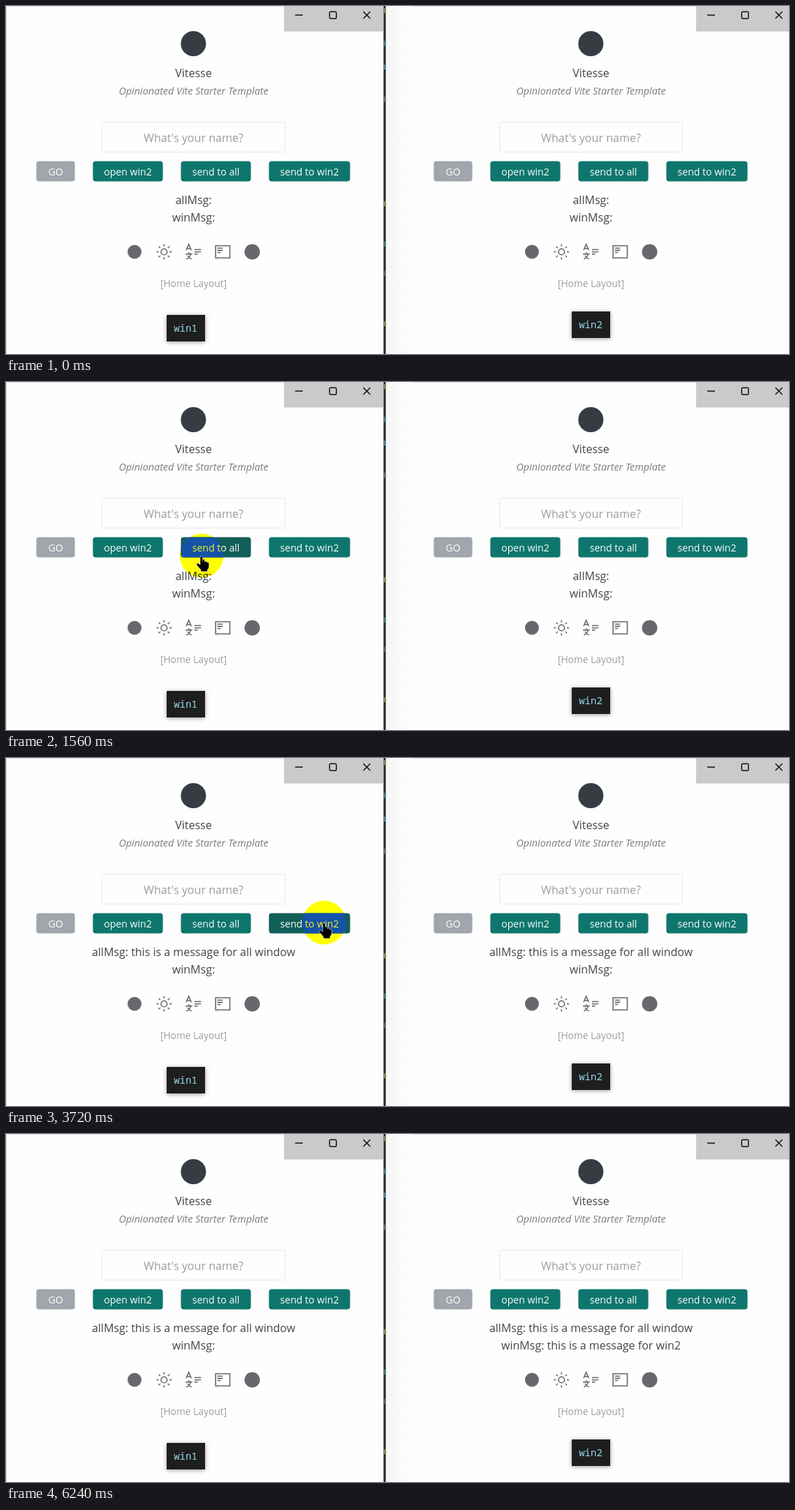
Animation, 1121 px wide and 499 px high, one loop 6840 ms. Source, as an HTML page with a canvas:

```html
<!DOCTYPE html>
<html lang="en">
<head>
<meta charset="utf-8">
<title>Two windows</title>
<style>
html, body { margin: 0; width: 100%; height: 100%; overflow: hidden; background: #fefefe; }
canvas { display: block; }
</style>
</head>
<body>
<canvas id="stage" width="1121" height="499"></canvas>
<script>
const ctx = document.getElementById('stage').getContext('2d');
const LOOP = 6840, RIGHT = 569, SPOT = 31.4;
const SANS = '"Open Sans", "Noto Sans", sans-serif';
const MONO = '"Noto Sans Mono", "DejaVu Sans Mono", monospace';

const plain = {
  bg: '#fefefe', text: '#42454a', soft: '#7b7d80', hint: '#9b9d9f', icon: '#66686b',
  logo: '#373b42', go: '#a1a6ac', btn: '#0f766d', hover: '#125e58', label: '#fbfdfc', line: '#e4e6e8'
};
const lit = {
  ...plain, bg: '#ffff00', text: '#48480c', soft: '#77770c', hint: '#9c9c08', icon: '#66662c',
  go: '#a2a600', btn: '#1453a8', hover: '#1453a8', label: '#f4f61c', line: '#e5e700'
};

const buttons = [
  { x: 43, w: 56, label: 'GO', off: true },
  { x: 124, w: 101, label: 'open win2' },
  { x: 250, w: 101, label: 'send to all' },
  { x: 376, w: 117, label: 'send to win2' }
];

// time, x, y of the spotlight centre
const path = [
  [360, 405, 545], [780, 334, 338], [1080, 334, 338], [1560, 280, 249], [1740, 281, 241],
  [3000, 281, 241], [3660, 455.5, 236], [4140, 455.5, 236], [4440, 454.5, 238],
  [5640, 454.5, 238], [6120, 470, 545]
];

function pointerAt(t) {
  const i = path.findIndex(p => p[0] > t);
  if (i < 1) return null;
  const [t0, x0, y0] = path[i - 1], [t1, x1, y1] = path[i];
  const u = (t - t0) / (t1 - t0), e = u * u * (3 - 2 * u);
  return { x: x0 + (x1 - x0) * e, y: y0 + (y1 - y0) * e };
}

function text(str, x, y, size, color, family = SANS, style = '') {
  ctx.font = `${style} ${size}px ${family}`;
  ctx.fillStyle = color;
  ctx.fillText(str, x, y);
}

function rect(x, y, w, h, color) {
  ctx.fillStyle = color;
  ctx.fillRect(x, y, w, h);
}

function disc(x, y, r, color) {
  ctx.fillStyle = color;
  ctx.beginPath();
  ctx.arc(x, y, r, 0, Math.PI * 2);
  ctx.fill();
}

function box(x, y, w, h, r) {
  ctx.beginPath();
  ctx.roundRect(x, y, w, h, r);
}

function stroke(d, color, width) {
  ctx.strokeStyle = color;
  ctx.lineWidth = width;
  ctx.stroke(new Path2D(d));
}

function sun(x, y, color) {
  let d = '';
  for (let i = 0; i < 8; i++) {
    const c = Math.cos(i * Math.PI / 4), s = Math.sin(i * Math.PI / 4);
    d += `M${x + c * 7.7} ${y + s * 7.7}L${x + c * 11} ${y + s * 11}`;
  }
  stroke(d, color, 1.6);
  ctx.beginPath();
  ctx.arc(x, y, 4.3, 0, Math.PI * 2);
  ctx.stroke();
}

function icons(c) {
  disc(184, 352.5, 10, c);
  sun(226.3, 352.5, c);
  ctx.save();
  ctx.translate(255.6, 339.8);
  ctx.scale(0.79, 0.79);
  stroke('M3 13L7.67 2.5L12.3 13M4.8 10H10.6M18 12H30M18 16H30M18 20H24M2 20H14M8 17V20M11.2 20Q10 26.5 3.3 29M5.4 23Q7.5 27 12.7 29', c, 2);
  ctx.restore();
  stroke('M300.1 343.8H320.5V361.2H300.1ZM302.6 347.2H310.4M302.6 350.4H310.4M302.6 353.5H307.3', c, 1.6);
  disc(352.5, 352.5, 11, c);
}

function page(c, all, win, hovered) {
  disc(268.3, 54, 18, c.logo);
  text('Vitesse', 268.5, 102, 16, c.text);
  text('Opinionated Vite Starter Template', 268.5, 127, 14.4, c.soft, SANS, 'italic');
  box(137.5, 166.5, 262, 43, 3);
  ctx.strokeStyle = c.line;
  ctx.lineWidth = 1;
  ctx.stroke();
  text("What's your name?", 268.5, 195, 16.1, c.hint);
  for (const b of buttons) {
    box(b.x + 0.4, 222.4, b.w - 0.8, 29.2, 4);
    ctx.fillStyle = b.off ? c.go : b === hovered ? c.hover : c.btn;
    ctx.fill();
    text(b.label, b.x + b.w / 2, 243, 14.1, c.label);
  }
  text('allMsg:' + all, 268.5, 284, 16, c.text);
  text('winMsg:' + win, 268.5, 309, 16, c.text);
  icons(c.icon);
  text('[Home Layout]', 268.5, 403, 13.8, c.hint);
}

function titleBar(x, w, mid) {
  rect(x, 0, w, 36.5, '#cacaca');
  stroke(`M${mid - 54} 13H${mid - 43}M${mid + 43.5} 8L${mid + 53.5} 18M${mid + 53.5} 8L${mid + 43.5} 18`, '#111', 1.5);
  box(mid - 4.7, 8.3, 9.6, 9.6, 1.5);
  ctx.stroke();
}

function tag(label, x, y) {
  ctx.save();
  ctx.shadowColor = 'rgba(0,0,0,.4)';
  ctx.shadowBlur = 6;
  ctx.shadowOffsetY = 1;
  rect(x, y, 55, 38, '#1e1e1e');
  ctx.restore();
  text(label, x + 27, y + 24, 14, '#92d8e8', MONO);
}

function gap() {
  rect(540.5, 0, 3.2, 499, '#2b2b2b');
  const specks = ['#8a8552', '#2f7c8f', '#3a8fa5', '#666', '#8f8650', '#38788a', '#5a5a5a', '#8c8448'];
  const spots = [3, 50, 84, 130, 280, 338, 380, 452];
  spots.forEach((y, i) => rect(541, y, 2, 7, specks[i]));
}

function backdrop() {
  rect(0, 0, 1121, 499, plain.bg);
  rect(0, 0, 1121, 1, '#dedede');
  rect(0, 0, 1, 499, '#d4d4d4');
  const shade = ctx.createLinearGradient(544, 0, 580, 0);
  shade.addColorStop(0, '#f4f6f6');
  shade.addColorStop(1, plain.bg);
  rect(544, 0, 36, 499, shade);
  gap();
}

function cursor(x, y, hand) {
  const d = hand
    ? 'M0 1.5Q0-.5 1.6-.5T3.2 1.5V7Q5-.0 6.2 7.4Q8.8 6 9.4 8.2Q12.2 7.5 12.2 10V14Q12.2 17 10 18.5V21H1V18.8L-4.5 12.5Q-6 10-3.7 9.5L0 12Z'
    : 'M0 0V16.5L3.8 13L6.2 18.6L8.9 17.4L6.5 12H11.6Z';
  const shape = new Path2D(d);
  ctx.save();
  ctx.translate(x, y);
  ctx.lineWidth = 1.2;
  ctx.lineJoin = 'round';
  ctx.strokeStyle = 'rgba(255,255,255,.75)';
  ctx.stroke(shape);
  ctx.fillStyle = '#000';
  ctx.fill(shape);
  ctx.restore();
}

function draw(now) {
  const t = now % LOOP;
  const all = t >= 2100 ? ' this is a message for all window' : '';
  const win = t >= 4200 ? ' this is a message for win2' : '';
  const p = pointerAt(t);
  const hovered = p && buttons.find(b =>
    p.x + 1 >= b.x && p.x + 1 <= b.x + b.w && p.y + 1 >= 222 && p.y + 1 <= 252);

  ctx.textAlign = 'center';
  backdrop();
  titleBar(398, 142, 468);
  titleBar(988, 133, 1058);
  // the spotlight lies under the page, which is then recoloured inside it
  if (p) disc(p.x, p.y, SPOT, lit.bg);
  page(plain, all, '', hovered);
  if (p) {
    ctx.save();
    ctx.beginPath();
    ctx.arc(p.x, p.y, SPOT, 0, Math.PI * 2);
    ctx.clip();
    page(lit, all, '', hovered);
    ctx.restore();
  }
  ctx.save();
  ctx.translate(RIGHT, 0);
  page(plain, all, win);
  ctx.restore();
  tag('win1', 230, 443);
  tag('win2', 810, 438);
  if (p) cursor(p.x + (hovered ? -1.8 : 1.5), p.y + 1.5, !!hovered);
}

function tick() {
  draw(performance.now());
  requestAnimationFrame(tick);
}
tick();
</script>
</body>
</html>
```
